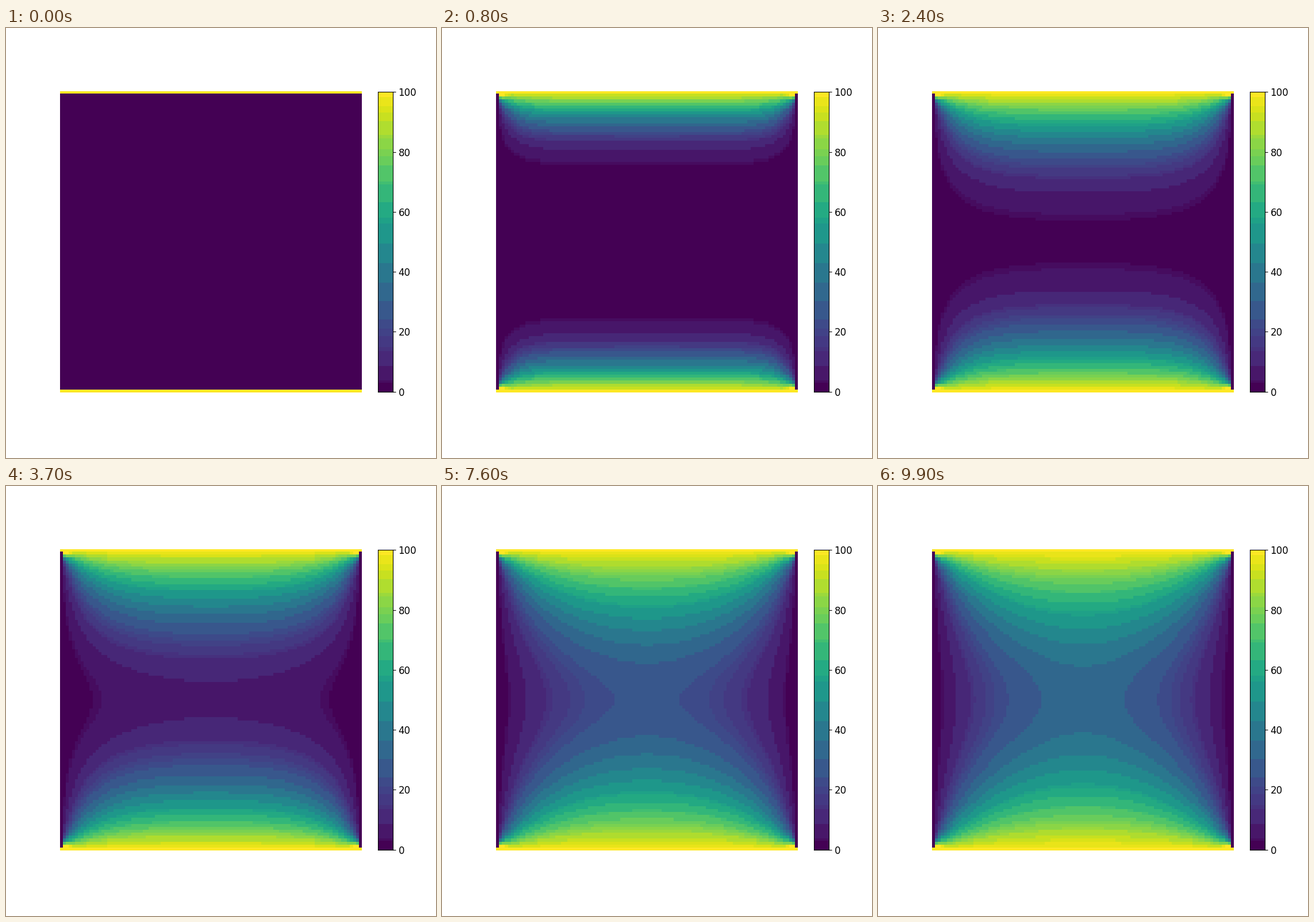
Write a matplotlib script that moves like this. It is 748x748 px and loops after 10000 ms.

```python
import numpy as np
import matplotlib.pyplot as plt
from matplotlib.animation import FuncAnimation

SIZE, DPI = 748, 100
FRAMES, INTERVAL = 100, 100
N = 100          # interior cells per side
HOT = 100.0      # temperature of the top and bottom walls
CORNER = 400.0   # extra heating in the corner cells
RATE = 8.0       # diffusion number per frame

# Limits of the flat colour bands
EDGES = np.array([
    0, 3.0, 3.75, 8.5, 13.5, 14.9, 18.5, 21, 24.1, 30.2, 36.4, 42.9, 49.4,
    56.1, 58, 63.2, 69.2, 70.2, 75.6, 78.6, 80.9, 84.5, 85.7, 90.3, 93.1,
    95.3, 98.4, 100])
LEVELS = (EDGES[:-1] + EDGES[1:]) / 2
LEVELS[0], LEVELS[-1] = 0, 100

# Heat equation solved in the sine basis
k = np.arange(1, N + 1)
SINE = np.sqrt(2 / (N + 1)) * np.sin(np.pi * np.outer(k, k) / (N + 1))
lam = 2 - 2 * np.cos(np.pi * k / (N + 1))
LAM = lam[:, None] + lam[None, :]

source = np.zeros((N, N))
source[[0, -1], :] = HOT
source[np.ix_([0, -1], [0, -1])] += CORNER
STEADY = SINE @ source @ SINE / LAM


def temperature(frame):
    field = np.zeros((N + 2, N + 2))
    field[[0, -1], :] = HOT
    modes = STEADY * (1 - np.exp(-RATE * frame * LAM))
    field[1:-1, 1:-1] = SINE @ modes @ SINE
    return field


def banded(field):
    return LEVELS[np.digitize(field, EDGES[1:-1])]


def pixel_axes(fig, left, top, width, height):
    return fig.add_axes([left / SIZE, 1 - (top + height) / SIZE,
                         width / SIZE, height / SIZE])


fig = plt.figure(figsize=(SIZE / DPI, SIZE / DPI), dpi=DPI, facecolor="white")
style = dict(cmap="viridis", vmin=0, vmax=100)

ax = pixel_axes(fig, 93.5, 109.75, 524.5, 524.5)
ax.axis("off")
plate = ax.imshow(banded(temperature(0)), interpolation="nearest",
                  aspect="auto", **style)

bar = pixel_axes(fig, 646.7, 111.3, 26.1, 521.4)
bar.pcolormesh([0, 1], EDGES, LEVELS[:, None], **style)
bar.set_xticks([])
bar.set_yticks(range(0, 101, 20))
bar.yaxis.tick_right()
bar.tick_params(labelsize=12)


def update(frame):
    plate.set_data(banded(temperature(frame)))
    return [plate]


anim = FuncAnimation(fig, update, frames=FRAMES, interval=INTERVAL,
                     repeat=True, repeat_delay=0)
plt.show()
```
